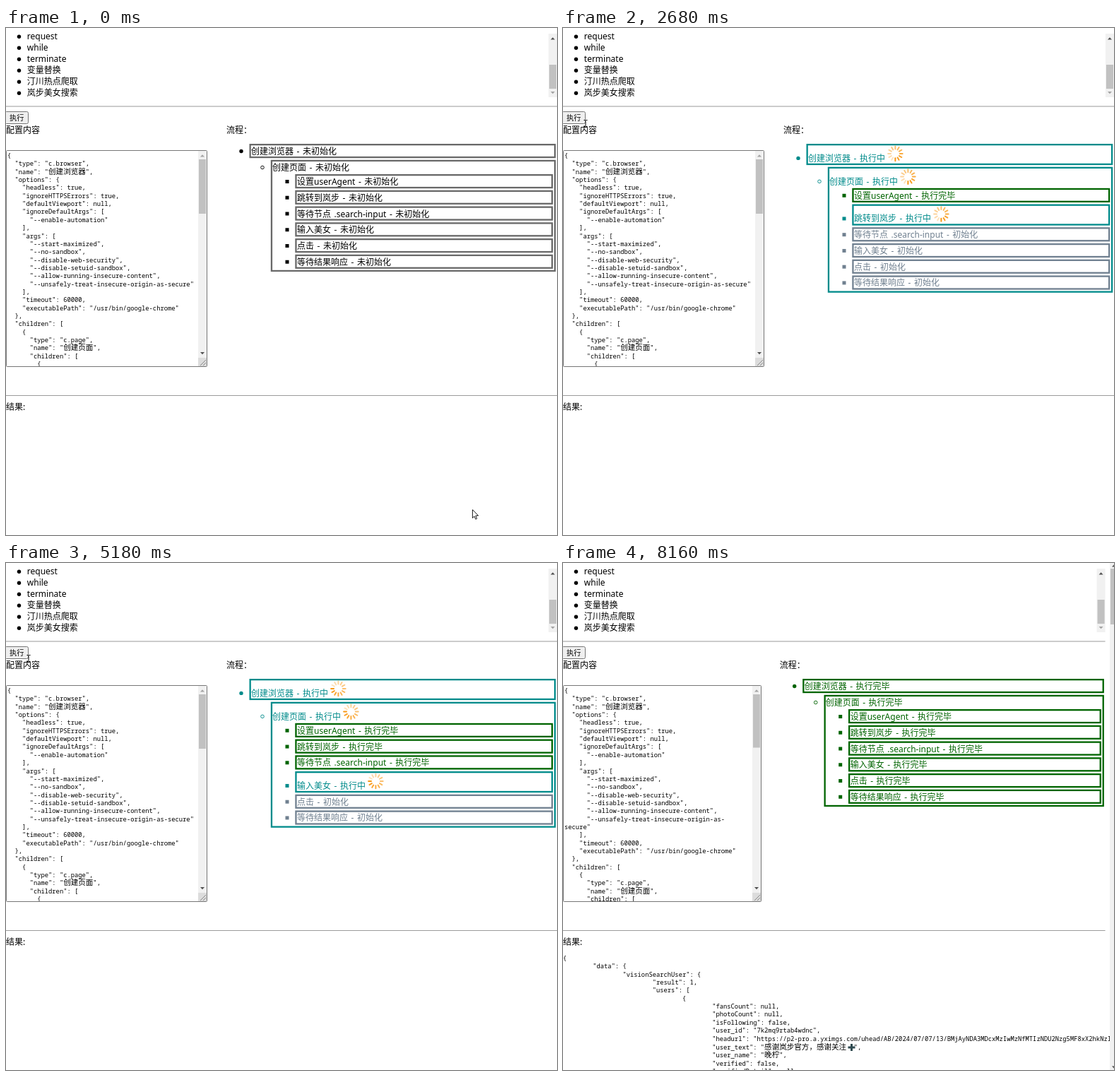
An HTML page with a canvas that plays this animation: 780 px wide and 718 px high, repeating every 8770 ms.

```html
<!DOCTYPE html>
<html lang="zh">
<head>
<meta charset="utf-8">
<title>流程</title>
<style>
html, body { margin: 0; width: 100%; height: 100%; overflow: hidden; background: #fff; }
canvas { display: block; }
</style>
</head>
<body>
<canvas id="stage" width="780" height="718"></canvas>
<script>
const ctx = document.getElementById('stage').getContext('2d');
const LOOP = 8770, STEP = LOOP / 130;
const DONE_AT = 7140;
const SANS = '"Noto Sans", "Noto Sans CJK SC", sans-serif';
const MONO = '8.8px "Noto Sans Mono", "Liberation Mono", monospace';
const MONO_CJK = '10.56px "Noto Sans CJK SC", sans-serif';
const LINE = 11.35, TAB = 42.24;

const MENU = ['request', 'while', 'terminate', '变量替换', '汀川热点爬取', '岚步美女搜索'];

const CONFIG = `{
  "type": "c.browser",
  "name": "创建浏览器",
  "options": {
    "headless": true,
    "ignoreHTTPSErrors": true,
    "defaultViewport": null,
    "ignoreDefaultArgs": [
      "--enable-automation"
    ],
    "args": [
      "--start-maximized",
      "--no-sandbox",
      "--disable-web-security",
      "--disable-setuid-sandbox",
      "--allow-running-insecure-content",
      "--unsafely-treat-insecure-origin-as-secure"
    ],
    "timeout": 60000,
    "executablePath": "/usr/bin/google-chrome"
  },
  "children": [
    {
      "type": "c.page",
      "name": "创建页面",
      "children": [
        {`;
const CONFIG_LINES = CONFIG.split('\n');
const WRAPPED_LINES = CONFIG.replace('-as-secure', '-as-\nsecure').split('\n');

// [tab depth, text]
const RESULT = [
  [0, '{'],
  [1, '"data": {'],
  [2, '"visionSearchUser": {'],
  [3, '"result": 1,'],
  [3, '"users": ['],
  [4, '{'],
  [5, '"fansCount": null,'],
  [5, '"photoCount": null,'],
  [5, '"isFollowing": false,'],
  [5, '"user_id": "7k2mq9rtab4wdnc",'],
  [5, '"headurl": "https://p2-pro.a.yximgs.com/uhead/AB/2024/07/07/13/BMjAyNDA3MDcxMzIwMzNfMTIzNDU2Nzg5MF8xX2hkNzI'],
  [5, '"user_text": "感谢岚步官方，感谢关注\u3000",'],
  [5, '"user_name": "晚柠",'],
  [5, '"verified": false,'],
  [5, '"verifiedDetail": null,']
];

const STATES = {
  idle: ['未初始化', '#000', '#696969'],
  init: ['初始化', '#708090', '#708090'],
  run: ['执行中', '#008b8b', '#008b8b'],
  done: ['执行完毕', '#006400', '#006400']
};
const CHILDREN = ['设置userAgent', '跳转到岚步', '等待节点 .search-input', '输入美女', '点击', '等待结果响应'];
// [start, end] of the running phase
const BROWSER_RUN = [1080, DONE_AT], PAGE_RUN = [1280, 6390];
const CHILD_RUN = [[1410, 1550], [1610, 2890], [2890, 3100], [3160, 5250], [5250, 5250], [5250, 6390]];

// [time, x, y]
const PATH = [
  [0, 660, 682], [35, 660, 682], [605, 12, 125], [935, 12, 125], [940, 11, 125],
  [1345, 11, 125], [1484, 25, 133], [1619, 32, 135], [7500, 32, 135],
  [7610, 14, 190], [8095, 754, 655]
];

function text(str, x, y, color = '#000', size = 12) {
  ctx.font = `${size}px ${SANS}`;
  ctx.wordSpacing = '1.4px';
  ctx.fillStyle = color;
  ctx.fillText(str, x, y);
  return ctx.measureText(str).width;
}

function mono(str, x, y) {
  ctx.fillStyle = '#000';
  ctx.wordSpacing = '0px';
  for (const run of str.match(/[\x00-\xff]+|[^\x00-\xff]+/g)) {
    ctx.font = run.charCodeAt(0) > 255 ? MONO_CJK : MONO;
    ctx.fillText(run, x, y);
    x += ctx.measureText(run).width;
  }
}

function rect(x, y, w, h, color) {
  ctx.fillStyle = color;
  ctx.fillRect(x, y, w, h);
}

function frame(x, y, right, bottom, color) {
  const w = 2.3;
  ctx.strokeStyle = color;
  ctx.lineWidth = w;
  ctx.strokeRect(x + w / 2, y + w / 2, right - x - w, bottom - y - w);
}

function polygon(points, fill) {
  ctx.beginPath();
  for (const [x, y] of points) ctx.lineTo(x, y);
  ctx.closePath();
  ctx.fillStyle = fill;
  ctx.fill();
}

function arrowhead(x, y, dir, color) {
  polygon([[x - 3, y + 1.5 * dir], [x + 3, y + 1.5 * dir], [x, y - 1.8 * dir]], color);
}

function scrollbar(x, top, bottom, thumbTop, thumbBottom, upColor, downColor) {
  rect(x, top, 12, bottom - top, '#f1f1f1');
  rect(x + 1, thumbTop, 10, thumbBottom - thumbTop, '#c1c1c1');
  arrowhead(x + 6, top + 7, 1, upColor);
  arrowhead(x + 6, bottom - 6.5, -1, downColor);
}

function dot(x, y, color, hollow) {
  ctx.beginPath();
  ctx.arc(x, y, hollow ? 2.3 : 2.7, 0, 7);
  ctx.fillStyle = ctx.strokeStyle = color;
  ctx.lineWidth = 0.9;
  hollow ? ctx.stroke() : ctx.fill();
}

function spinner(x, y, t) {
  const head = Math.floor((t - 1480) / 94) + 6;
  ctx.lineWidth = 2;
  ctx.lineCap = 'round';
  for (let i = 0; i < 12; i++) {
    const age = (((head - i) % 12) + 12) % 12;
    const a = i * Math.PI / 6, s = Math.sin(a), c = -Math.cos(a);
    ctx.strokeStyle = `rgba(248,152,20,${1 - age * 0.065})`;
    ctx.beginPath();
    ctx.moveTo(x + s * 6.4, y + c * 6.4);
    ctx.lineTo(x + s * 10.3, y + c * 10.3);
    ctx.stroke();
  }
  ctx.lineCap = 'butt';
}

function stateAt(t, [start, end]) {
  if (t < 1080) return 'idle';
  if (t < start) return 'init';
  return t < end ? 'run' : 'done';
}

function label(name, state, x, y, t) {
  const [word, color] = STATES[state];
  const w = text(`${name} - ${word}`, x, y, color);
  if (state === 'run') spinner(x + w + 14.5, y - 11, t);
}

function flow(t, left, right) {
  const extra = state => state === 'run' ? 9.9 : 0;
  const browser = stateAt(t, BROWSER_RUN), page = stateAt(t, PAGE_RUN);

  let y = 164, grow = extra(browser);
  frame(344.5 + left, y, 778.3 + right, y + 20.2 + grow, STATES[browser][2]);
  dot(333 + left, y + 10.5 + grow, STATES[browser][1]);
  label('创建浏览器', browser, 347 + left, y + 15 + grow, t);

  y += 22.8 + grow;
  const top = y;
  grow = extra(page);
  dot(363 + left, y + 10.7 + grow, STATES[page][1], true);
  label('创建页面', page, 377 + left, y + 15 + grow, t);

  y += 20.2 + grow;
  CHILDREN.forEach((name, i) => {
    const state = stateAt(t, CHILD_RUN[i]);
    grow = extra(state);
    frame(409.3 + left, y, 774.3 + right, y + 20.2 + grow, STATES[state][2]);
    rect(395.5 + left, y + 8 + grow, 5, 5, STATES[state][1]);
    label(name, state, 412 + left, y + 15 + grow, t);
    y += 22.75 + grow;
  });
  frame(374.8 + left, top, 778.3 + right, y + 1.6, STATES[page][2]);
}

function textarea(done) {
  const right = done ? 281 : 285, bar = right - 13;
  ctx.save();
  ctx.beginPath();
  ctx.rect(0, 174, bar, 305);
  ctx.clip();
  (done ? WRAPPED_LINES : CONFIG_LINES).forEach((s, i) => {
    if (s) mono(s, 2, 184 + i * LINE);
  });
  ctx.restore();
  scrollbar(bar, 174, 467, 186, done ? 261.5 : 263, '#a3a3a3', '#505050');
  rect(bar, 467, 12, 12, '#dcdcdc');
  ctx.strokeStyle = '#777';
  ctx.lineWidth = 0.8;
  for (const d of [8, 4]) {
    ctx.beginPath();
    ctx.moveTo(right - 2 - d, 478);
    ctx.lineTo(right - 2, 478 - d);
    ctx.stroke();
  }
  ctx.strokeStyle = '#767676';
  ctx.lineWidth = 1;
  ctx.beginPath();
  ctx.roundRect(0.5, 173.5, right - 1, 306, 1);
  ctx.stroke();
}

function button(hover) {
  ctx.beginPath();
  ctx.roundRect(-1.5, 118.5, 33, 17, 2);
  ctx.fillStyle = hover ? '#e5e5e5' : '#efefef';
  ctx.fill();
  ctx.strokeStyle = hover ? '#4f4f4f' : '#767676';
  ctx.lineWidth = 1;
  ctx.stroke();
  text('执行', 5, 130.8, '#000', 10.2);
}

function result() {
  ctx.save();
  ctx.beginPath();
  ctx.rect(0, 550, 774, 168);
  ctx.clip();
  RESULT.forEach(([depth, s], i) => mono(s, depth * TAB, 563 + i * LINE + (i > 10 ? 1 : 0)));
  ctx.restore();
  rect(403.5, 684.5, 10, 3, '#2f4a50');
  rect(407, 681, 3, 10, '#2f4a50');
}

function cursor(t) {
  const q = Math.floor((t + 6) / STEP) * STEP;
  if (q > 8110) return;
  let i = 0;
  while (i < PATH.length - 2 && PATH[i + 1][0] <= q) i++;
  const [t0, x0, y0] = PATH[i], [t1, x1, y1] = PATH[i + 1];
  const p = Math.min(1, (q - t0) / (t1 - t0));
  const e = p * p * (3 - 2 * p);
  const x = x0 + (x1 - x0) * e, y = y0 + (y1 - y0) * e;

  if (q > 1580 && q < 7620) {
    rect(x - 0.5, y - 4, 1, 8.5, '#000');
    for (const end of [-5, 4]) {
      rect(x - 2.5, y + end, 2, 1, '#000');
      rect(x + 0.5, y + end, 2, 1, '#000');
    }
    return;
  }
  const shape = [[0.4, 0], [0.4, 12], [3, 9.5], [4.8, 13.6], [6.6, 12.8], [4.8, 8.8], [8.6, 8.6]];
  polygon(shape.map(([a, b]) => [x + a, y + b]), '#fff');
  ctx.strokeStyle = '#000';
  ctx.lineWidth = 0.9;
  ctx.stroke();
}

function draw(t) {
  const done = t >= DONE_AT;
  const shift = done ? -12.4 : 0, left = done ? -5.3 : 0;
  rect(0, 0, 780, 718, '#fff');

  MENU.forEach((s, i) => {
    dot(18.5, 12.3 + i * 16, '#000');
    text(s, 29.8, 16 + i * 16);
  });
  scrollbar(768 + shift, 8, 98, 52, 86, '#505050', '#a3a3a3');
  rect(0, 110.5, 780 + shift, 1, '#9a9a9a');
  rect(0, 520, 780 + shift, 1, '#9a9a9a');

  button(t >= 605 && t < 1550);
  text('配置内容', 0, 148.5);
  text('流程：', 312 + left, 148.5);
  text('结果:', 0, 541);
  textarea(done);
  flow(t, left, shift);
  if (done) {
    result();
    rect(774, 0, 6, 718, '#f1f1f1');
    rect(775, 8, 5, 79, '#c1c1c1');
    arrowhead(780, 4, 1, '#505050');
    arrowhead(780, 714, -1, '#505050');
  }
  cursor(t);
}

const start = performance.now();
function tick() {
  draw((performance.now() - start) % LOOP);
  requestAnimationFrame(tick);
}
tick();
</script>
</body>
</html>
```
